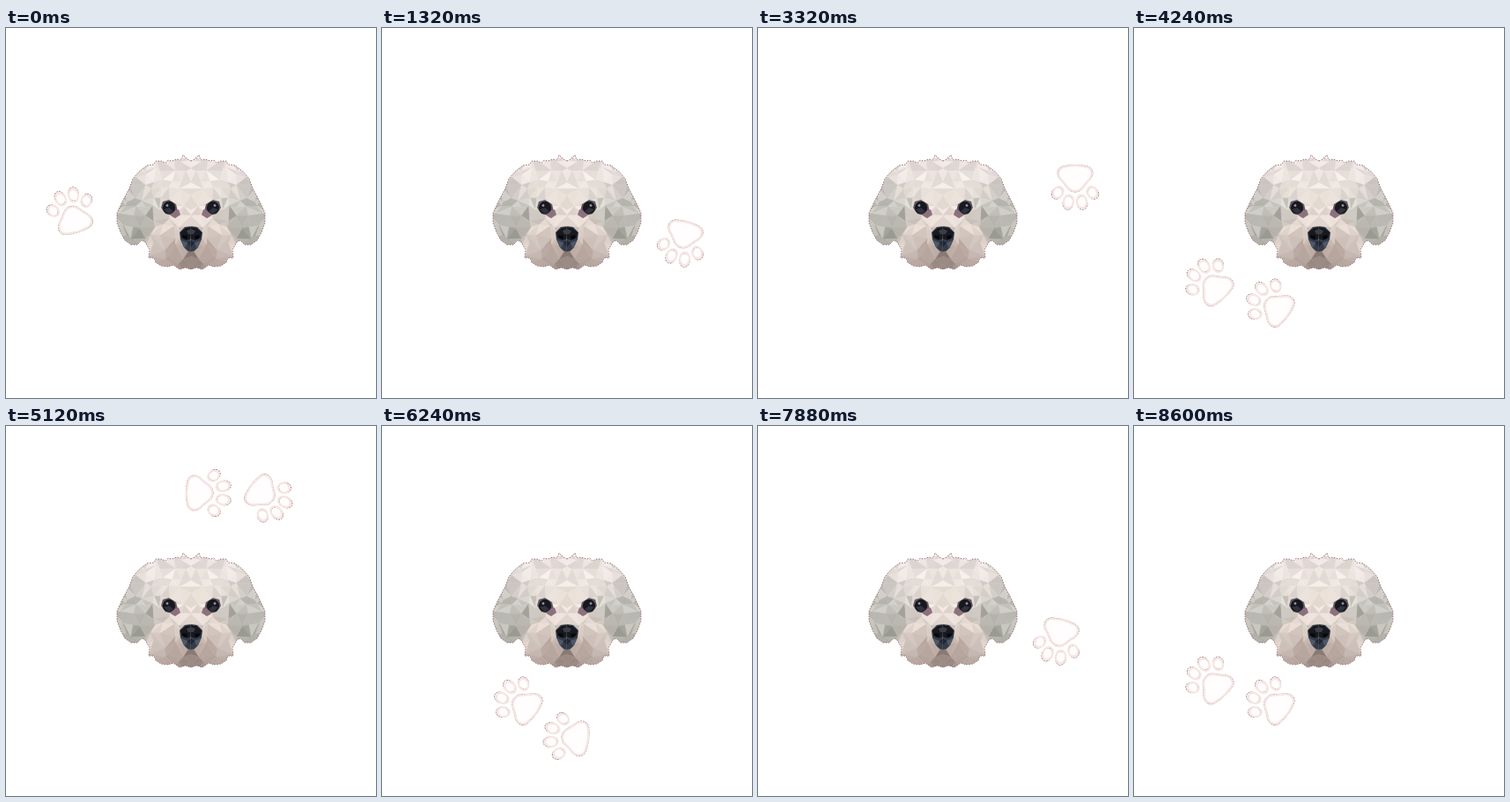
An HTML page for the animation above (8720 ms loop, 420 px wide and 420 px high).

```html
<!DOCTYPE html>
<html lang="en">
<head>
<meta charset="utf-8">
<title>Walking paws</title>
<style>
  html, body { margin: 0; width: 100%; height: 100%; overflow: hidden; background: #fff; }
  svg { display: block; width: 420px; height: 420px; }
  #paw { fill: #fffdfd; stroke: #96706f; stroke-width: .8; stroke-dasharray: 2.2 .9; }
  .glow { fill: none; stroke: #f6e6e4; stroke-width: 2.4; stroke-dasharray: none; }
  .edge { fill: none; stroke: #9c7479; stroke-width: 1; stroke-dasharray: 1.5 1.5; }
</style>
</head>
<body>
<svg viewBox="0 0 420 420">
  <defs>
    <g id="toes">
      <ellipse rx="5.8" ry="7" transform="translate(-20.5 -16.5) rotate(-32)"/>
      <ellipse rx="5.8" ry="7.8" transform="translate(-8 -27.5) rotate(-9)"/>
      <ellipse rx="5.8" ry="7.8" transform="translate(8 -27.5) rotate(9)"/>
      <ellipse rx="5.8" ry="7" transform="translate(20.5 -16.5) rotate(32)"/>
      <path d="M0-15C8-15 10-8 15-3C23 4 21 14 11 14.5C5 16 -5 16 -11 14.5C-21 14 -23 4 -15-3C-10-8 -8-15 0-15Z"/>
    </g>
    <g id="paw"><use href="#toes"/><use href="#toes" class="glow" transform="scale(.94)"/></g>
    <clipPath id="headClip"><polygon id="clipShape"/></clipPath>
    <g id="half">
      <g id="facets" clip-path="url(#headClip)"></g>
      <polyline id="edge" class="edge"/>
      <path d="M178 197L185 195L193 200L195 208L190 213L181 211L176 204Z" fill="#625961"/>
      <path d="M189 208L196 206L198 212L192 216L187 213Z" fill="#8d707d"/>
      <circle cx="185" cy="204" r="7.2" fill="#17181d"/>
      <path d="M179 206L185 204L190 208L185 211Z" fill="#30343e"/>
      <circle cx="183" cy="201.5" r="1.4" fill="#8b929b"/>
      <path d="M210.5 225L203 226L197 232L198 240L202 249L206 253L210.5 254Z" fill="#343c49"/>
      <path d="M210.5 226L204 227L198 232L199 238L205 241L210.5 239Z" fill="#17191f"/>
      <path d="M210.5 228L205 230L207 234L210.5 234Z" fill="#3d3e45"/>
      <path d="M200 235L206 236L205 240L201 239Z" fill="#07080b"/>
      <path d="M199 241L206 244L203 250Z" fill="#50596a"/>
      <path d="M206 244L210.5 241L210.5 249Z" fill="#1f2631"/>
    </g>
  </defs>
  <use href="#half"/>
  <use href="#half" transform="translate(420) scale(-1 1)"/>
  <g id="trail"></g>
</svg>
<script>
const $ = id => document.getElementById(id);
const add = (parent, tag, attrs) => {
  const node = document.createElementNS('http://www.w3.org/2000/svg', tag);
  for (const key in attrs) node.setAttribute(key, attrs[key]);
  return parent.appendChild(node);
};

let seed = 11;
const random = () => (seed = seed * 16807 % 2147483647) / 2147483647;

// Left half of the head; the right half is its mirror image.
const outline = '210,151 206,149 201,144 199,150 194,149 188,151 184,150 181,153 176,151 170,151 168,155 ' +
  '160,156 151,163 144,171 140,182 133,195 126,210 126,221 130,232 135,241 142,246 149,246 154,241 ' +
  '158,243 163,252 162,261 168,261 170,266 176,270 184,271 190,269 197,274 204,272 210,274';
$('edge').setAttribute('points', outline);
$('clipShape').setAttribute('points', outline + ' 210.6,274 210.6,151');

const tones = [
  [200, 155, 'efe6e3'], [180, 164, 'ede4e0'], [160, 167, 'e4dcd9'], [205, 180, 'eae2dc'],
  [148, 181, 'cfcac6'], [144, 200, 'c4c3bc'], [136, 220, 'c8c7c0'], [148, 238, 'a6a69e'],
  [160, 215, 'adaca4'], [168, 200, 'd4d0ca'], [174, 186, 'e8dfd9'], [200, 212, 'eee3dc'],
  [178, 233, 'e7dbd3'], [169, 252, 'd8cac4'], [184, 263, 'b5a49d'], [206, 264, '8f7f79'],
  [193, 250, 'c8b7ae'], [206, 196, 'dfd5cd']
].map(([x, y, hex]) => [x, y, hex.match(/../g).map(h => parseInt(h, 16))]);

function toneAt(x, y) {
  const sum = [0, 0, 0];
  let total = 0;
  for (const [tx, ty, rgb] of tones) {
    const weight = 1 / (((x - tx) ** 2 + (y - ty) ** 2) ** 1.5 + 40);
    total += weight;
    rgb.forEach((c, i) => sum[i] += c * weight);
  }
  const shade = (random() - .55) * 34;
  return `rgb(${sum.map(c => Math.max(0, Math.min(250, Math.round(c / total + shade))))})`;
}

const cell = 11, columns = 8, rows = 13;
const grid = Array.from({ length: rows + 1 }, (_, r) =>
  Array.from({ length: columns + 1 }, (_, c) => [
    210.6 - (columns - c) * cell + (c < columns ? (random() - .5) * 9 : 0),
    138 + r * cell + (random() - .5) * 9
  ]));

function facet(...points) {
  const mid = i => points.reduce((s, p) => s + p[i], 0) / 3;
  const color = toneAt(mid(0), mid(1));
  add($('facets'), 'polygon', { points: points.join(' '), fill: color, stroke: color, 'stroke-width': .6 });
}
for (let r = 0; r < rows; r++) {
  for (let c = 0; c < columns; c++) {
    const a = grid[r][c], b = grid[r][c + 1], d = grid[r + 1][c], e = grid[r + 1][c + 1];
    if (random() < .5) { facet(a, b, d); facet(b, e, d); }
    else { facet(a, b, e); facet(a, e, d); }
  }
}

// x, y, heading, time on, time off (ms within one lap)
const LAP = 2180, LOOP = 4 * LAP, TICK = 40;
const prints = [
  [77, 217, -17, 0, 195], [66, 150, 12, 115, 315], [107, 103, 45, 275, 475],
  [153, 64, 76, 435, 690], [220, 76, 90, 635, 815], [291, 76, 128, 735, 1015],
  [359, 109, 155, 855, 1130], [360, 171, 180, 1015, 1310], [343, 235, 195, 1250, 1395],
  [342, 315, 225, 1350, 1595], [278, 333, 255, 1555, 1715], [219, 354, 277, 1675, 1950],
  [162, 318, 306, 1875, LAP], [92, 295, 317, 2035, LAP]
].map(([x, y, heading, on, off]) => ({
  on, off,
  node: add($('trail'), 'use', { href: '#paw', transform: `translate(${x} ${y}) rotate(${heading})` })
}));

const start = performance.now();
function draw(now) {
  const time = Math.max(0, now - start) % LOOP;
  const phase = Math.floor(time / TICK) * TICK % LAP;
  for (const { node, on, off } of prints) {
    node.style.display = phase >= on && phase < off ? '' : 'none';
  }
  requestAnimationFrame(draw);
}
draw(start);
</script>
</body>
</html>
```
